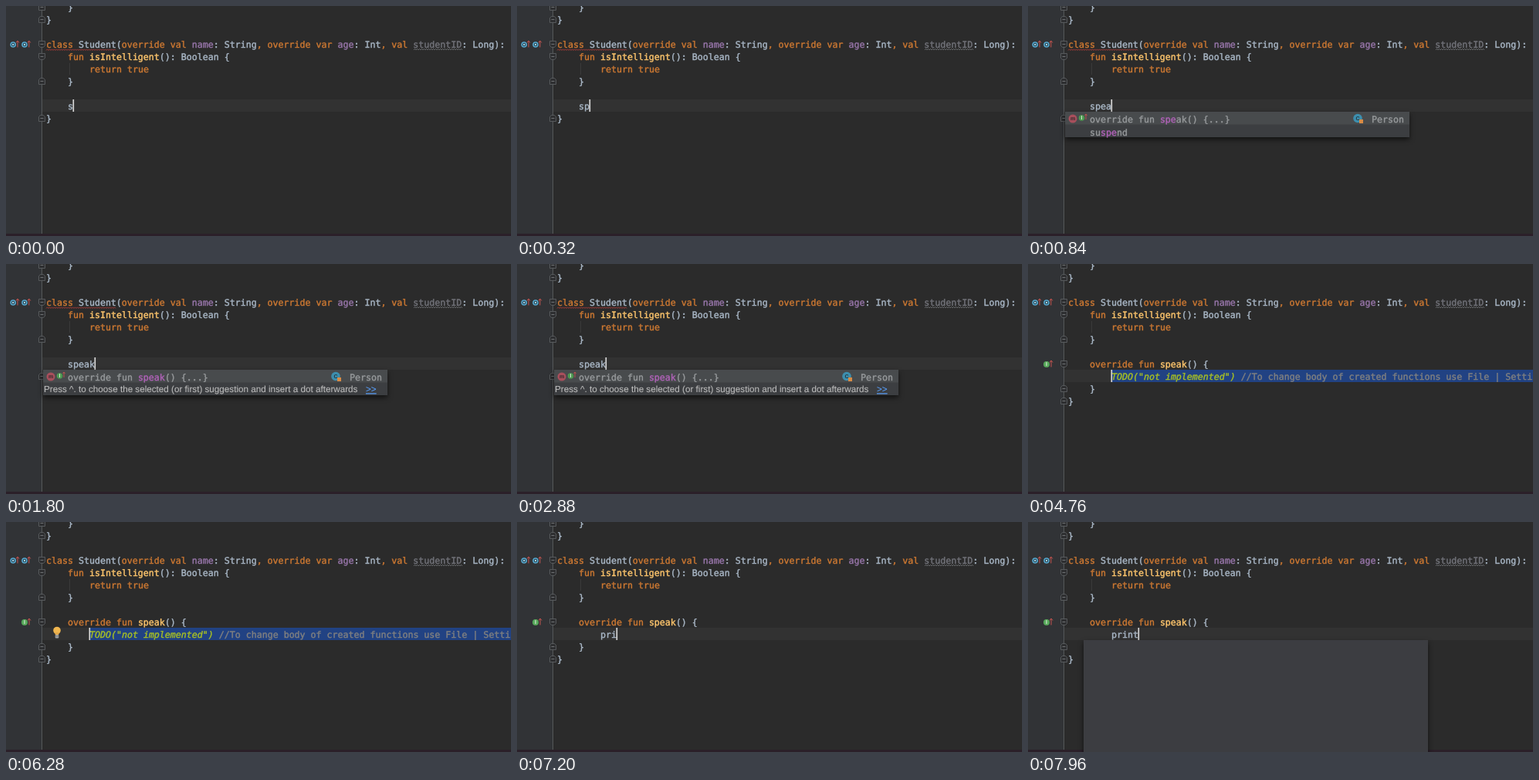
Animation of 654x298 px, one loop 8000 ms. Source, as an HTML page:

```html
<!DOCTYPE html>
<html lang="en">
<head>
<meta charset="utf-8">
<title>Overriding a function in an editor</title>
<style>
  html, body { margin: 0; width: 100%; height: 100%; overflow: hidden; background: #2b2b2b; }
  svg { display: block; width: 654px; height: 298px; }
  text {
    white-space: pre; color: #a9b7c6; font: 11.627px "DejaVu Sans Mono", monospace;
    text-rendering: geometricPrecision; stroke-width: 0.4px;
  }
  text, tspan { fill: currentColor; stroke: currentColor; }
  .k { color: #cc7832; }
  .f { color: #ffc66d; }
  .p { color: #9876aa; }
  .s { color: #6a8759; }
  .c { color: #808080; }
  .u { color: #72737a; }
  .t { color: #a8c023; font-style: italic; }
  .g { color: #96999b; }
  .m { color: #b062b8; }
  .hint { font: 11.68px "Liberation Sans", sans-serif; color: #bbbbbb; stroke-width: 0.1px; }
  .link { color: #589df6; text-decoration: underline; }
  .popup { filter: drop-shadow(0 3px 3px #0009); }
  .icon { font: bold 7px "Liberation Sans", sans-serif; text-anchor: middle; stroke: none; }
</style>
</head>
<body>
<svg id="stage" viewBox="0 0 654 298" xmlns="http://www.w3.org/2000/svg"></svg>
<script>
const LOOP = 8000, CHAR = 7, LINE = 16, LEFT = 52;
const ACCEPT = 3080, ANALYSED = 4480, BULB = 5600, REPLACE = 6560, LIST = 7920;

const rowTop = row => 41 + row * LINE;
const column = col => LEFT + col * CHAR;

// Shows the content only within [from, to).
const during = (from, to, content) => `<g data-from="${from}" data-to="${to}">${content}</g>`;
const rect = (x, y, w, h, fill, more = '') =>
  `<rect x="${x}" y="${y}" width="${w}" height="${h}" fill="${fill}" ${more}/>`;
const path = (d, stroke, width = 1, fill = 'none') =>
  `<path d="${d}" stroke="${stroke}" stroke-width="${width}" fill="${fill}"/>`;

// "[k word]" gives the word the class k.
const text = (x, y, source, cls = '') => `<text x="${x}" y="${y}" class="${cls}">` +
  source.replace(/\[(\w+) ([^\]]*)\]/g, '<tspan class="$1">$2</tspan>') + '</text>';
const code = (row, col, source) => text(column(col), rowTop(row) + 13, source);

const wave = (x, end, y, color) => {
  let d = `M${x} ${y}`;
  for (let i = 1; x + 1.5 * i <= end; i++) d += `L${x + 1.5 * i} ${y + (i % 2 ? -1.6 : 0)}`;
  return path(d, color, 0.8);
};

const fold = (row, dir) => {
  const y = rowTop(row) + 8.5;
  return path(`M42.5 ${y - 4 * dir}H50.5V${y + 2 * dir}L48.5 ${y + 4 * dir}H44.5L42.5 ${y + 2 * dir}Z`, '#5c5f61', 0.9, '#2e2f31') +
    path(`M44.5 ${y}H48.5`, '#777a7c', 0.9);
};
const foldStart = row => fold(row, 1);
const foldEnd = row => fold(row, -1);

const arrow = (x, y) => path(`M${x} ${y + 4}V${y - 4}M${x - 2} ${y - 2}L${x} ${y - 4.5}L${x + 2} ${y - 2}`, '#c75450', 1);
const propertyIcon = x =>
  `<circle cx="${x}" cy="50" r="3" fill="#263b46" stroke="#55a9d0" stroke-width="1.6"/>` +
  `<circle cx="${x}" cy="50" r="1.2" fill="#a5d3e8"/>` + arrow(x + 5.8, 49.5);
const letterIcon = (x, y, r, fill, letter, ink) =>
  `<circle cx="${x}" cy="${y}" r="${r}" fill="${fill}"/>` +
  `<text class="icon" x="${x}" y="${y + 2.4}" style="color:${ink}">${letter}</text>`;
const overrideIcon = (x, y) => letterIcon(x, y, 4, '#57a85a', 'I', '#e3eee0') + arrow(x + 6, y - 0.5);

const caret = (row, col) => rect(column(col) - 0.5, rowTop(row), 1.6, LINE, '#dddddd');
const typing = (row, col, steps, end) => steps.map(([time, word], i) =>
  during(time, i + 1 < steps.length ? steps[i + 1][0] : end,
    code(row, col, word) + caret(row, col + word.length))).join('');

const suggestion = match =>
  rect(48, 137, 446, 16.5, '#484b4d') +
  letterIcon(58, 146, 5.5, '#a84f5c', 'm', '#2f2a2c') +
  letterIcon(69.5, 145, 3.8, '#4e9a51', 'I', '#d5e4d2') +
  path('M75 147V140M73.5 142L75 140L76.5 142', '#c75450', 0.9) +
  text(80, 150.5, `override fun [m ${match}]${'speak'.slice(match.length)}() {...}`, 'g') +
  letterIcon(427, 145.5, 5.8, '#3d8fae', 'C', '#24363e') + rect(429, 147, 5, 5, '#d88b45') +
  text(445, 150.5, 'Person', 'g');
const popup = (height, content) =>
  `<g class="popup">${rect(48, 137, 446, height, '#3c3e41')}${content}</g>`;

const bulb =
  '<circle cx="66" cy="140.5" r="4.8" fill="#f0b64f"/>' +
  rect(63.7, 143, 4.6, 3, '#e3a94b') + rect(63.7, 146, 4.6, 4.5, '#a3a6a8', 'rx="1"') +
  path('M64 148H68', '#66696b', 0.8);

const base =
  rect(0, 0, 654, 298, '#2b2b2b') + rect(0, 0, 46, 298, '#313336') +
  during(0, ACCEPT, rect(47, rowTop(5), 607, LINE, '#323232')) +
  during(ACCEPT, LOOP, rect(47, rowTop(6), 607, LINE, '#323232')) +
  during(ACCEPT, REPLACE, rect(column(8), rowTop(6), 546, LINE, '#214283')) +
  path('M46.5 0V298', '#55585a') + path('M82.5 74V89', '#3a3a3a') +
  rect(0, 295, 654, 3, '#2b2029');

const source =
  code(-3, 4, '}') + code(-2, 0, '}') +
  code(0, 0, '[k class ]Student([k override val ][p name]: String[k , override var ][p age]: Int[k , val ][u studentID]: Long):') +
  wave(528, 591, 57, '#77797c') +
  during(0, ANALYSED, wave(52, 143, 57.5, '#bc3f3c')) +
  code(1, 4, '[k fun ][f isIntelligent](): Boolean {') +
  code(2, 8, '[k return true]') + code(3, 4, '}') +
  propertyIcon(9.2) + propertyIcon(24) +
  [-3, -2, 3].map(foldEnd).join('') + [0, 1].map(foldStart).join('');

const speakBody = '[c //To change body of created functions use File | Settings | File Templates.]';
const scenes =
  during(0, ACCEPT, code(6, 0, '}') + foldEnd(6)) +
  typing(5, 4, [[0, 's'], [200, 'sp'], [440, 'spe'], [800, 'spea'], [1080, 'speak']], ACCEPT) +
  during(600, 880, popup(33, suggestion('spe') + text(80, 168, 'su[m spe]nd', 'g'))) +
  during(880, 1080, popup(16.5, suggestion('spea'))) +
  during(1080, ACCEPT, popup(33, suggestion('speak') +
    text(49, 166.3, 'Press ^. to choose the selected (or first) suggestion and insert a dot afterwards', 'hint') +
    text(466, 166.3, '&gt;&gt;', 'hint link'))) +
  during(ACCEPT, LOOP, code(7, 4, '}') + code(8, 0, '}') + foldEnd(8)) +
  during(ACCEPT, ANALYSED, code(5, 4, '[k override fun ]speak() {') +
    code(6, 8, 'TODO([s "not implemented"]) ' + speakBody)) +
  during(ANALYSED, LOOP, code(5, 4, '[k override fun ][f speak]() {') +
    overrideIcon(24, 130) + foldStart(5) + foldEnd(7)) +
  during(ANALYSED, REPLACE, code(6, 8, '[t TODO("not implemented")] ' + speakBody)) +
  during(ACCEPT, REPLACE, caret(6, 8)) +
  during(BULB, REPLACE, bulb) +
  typing(6, 8, [[REPLACE, 'p'], [6840, 'pr'], [7080, 'pri'], [7280, 'prin'], [7480, 'print']], LOOP) +
  during(LIST, LOOP, `<g class="popup">${rect(72, 153, 446, 160, '#3c3d41')}</g>`);

const stage = document.getElementById('stage');
stage.innerHTML = base + source + scenes;
const parts = [...stage.querySelectorAll('[data-from]')];

function draw() {
  const time = performance.now() % LOOP;
  for (const part of parts) {
    const { from, to } = part.dataset;
    part.style.display = time >= +from && time < +to ? '' : 'none';
  }
  requestAnimationFrame(draw);
}
draw();
</script>
</body>
</html>
```
